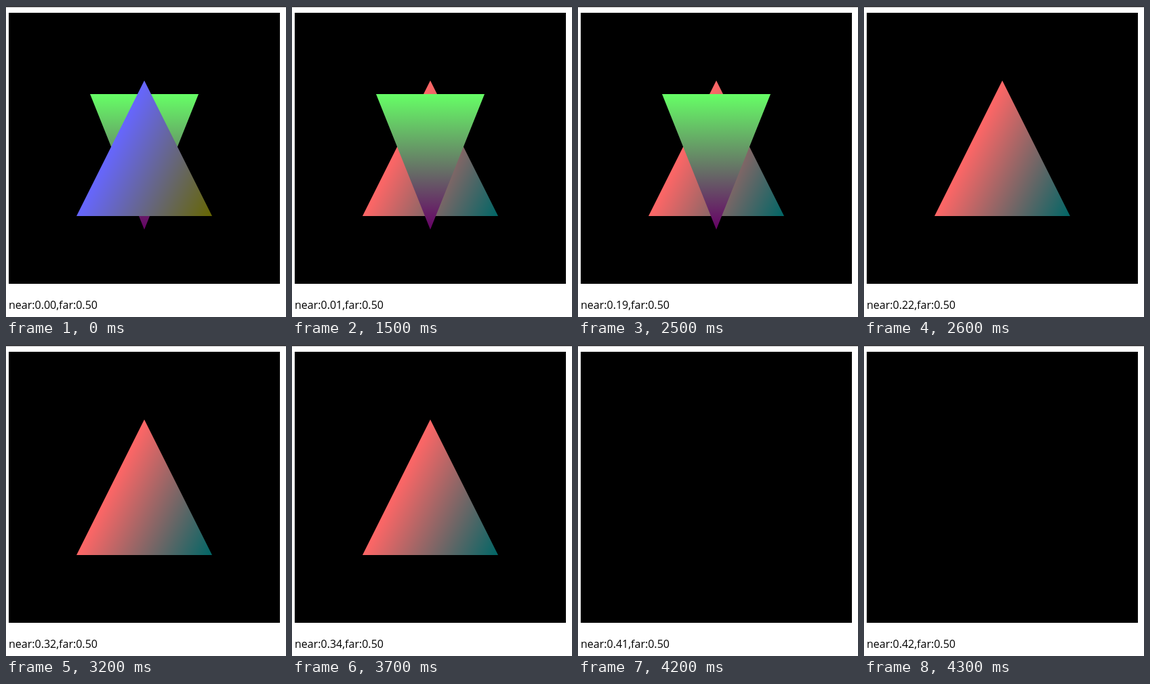
An HTML page for the animation above (6000 ms loop, 413x459 px).

```html
<!DOCTYPE html>
<html lang="en">
<head>
<meta charset="utf-8">
<title>Near and far clipping</title>
<style>
  html, body { margin: 0; width: 100%; height: 100%; overflow: hidden; background: #fff; }
  svg { display: block; }
  text { font: 16px "Open Sans", "Noto Sans", sans-serif; }
</style>
</head>
<body>
<svg width="413" height="459" viewBox="0 0 413 459">
  <defs>
    <linearGradient id="slant" gradientUnits="userSpaceOnUse" x1="144" y1="230" x2="304" y2="310">
      <stop stop-color="#ff6666"/><stop offset="1" stop-color="#006666"/>
    </linearGradient>
    <linearGradient id="blueSlant" gradientUnits="userSpaceOnUse" x1="144" y1="230" x2="304" y2="310">
      <stop stop-color="#6666ff"/><stop offset="1" stop-color="#666600"/>
    </linearGradient>
    <linearGradient id="drop" gradientUnits="userSpaceOnUse" x1="0" y1="130" x2="0" y2="330">
      <stop stop-color="#66ff66"/><stop offset="1" stop-color="#660066"/>
    </linearGradient>
  </defs>
  <rect width="413" height="1" fill="#232327"/>
  <rect y="1" width="413" height="1" fill="#77777a"/>
  <rect x="4" y="10" width="400" height="400"/>
  <path id="red" d="M204 110L104 310H304Z" fill="url(#slant)"/>
  <path id="green" d="M124 130H284L204 330Z" fill="url(#drop)"/>
  <path id="blue" d="M204 110L104 310H304Z" fill="url(#blueSlant)"/>
  <text id="label" x="4" y="447"></text>
</svg>
<script>
const LOOP = 6000;
const FAR = 50;
const el = id => document.getElementById(id);
const red = el('red'), green = el('green'), blue = el('blue'), label = el('label');

// Key presses: start time, near value in hundredths, and count of 100 ms repeats.
const runs = [
  { at: 0, near: 0, steps: 0 },
  { at: 1500, near: 1, steps: 0 },
  { at: 2000, near: 3, steps: 9 },
  { at: 3200, near: 32, steps: 0 },
  { at: 3700, near: 34, steps: 2 },
  { at: 4200, near: 41, steps: 1 }
];
const RATE = { 2000: 3.15, 3700: 3, 4200: 1 };

function nearAt(t) {
  const run = runs.filter(r => r.at <= t).pop();
  const step = Math.min(run.steps, Math.floor((t - run.at) / 100));
  return run.near + Math.round(step * (RATE[run.at] || 0));
}

const show = (shape, on) => shape.setAttribute('visibility', on ? 'visible' : 'hidden');
const fixed = n => (n / 100).toFixed(2);

function draw(t) {
  const near = nearAt(t);
  show(blue, near <= 0);
  show(green, near <= 20);
  show(red, near > 0 && near <= 40);
  label.textContent = `near:${fixed(near)},far:${fixed(FAR)}`;
}

let start;
function tick(now) {
  start ??= now;
  draw((now - start) % LOOP);
  requestAnimationFrame(tick);
}
draw(0);
requestAnimationFrame(tick);
</script>
</body>
</html>
```
